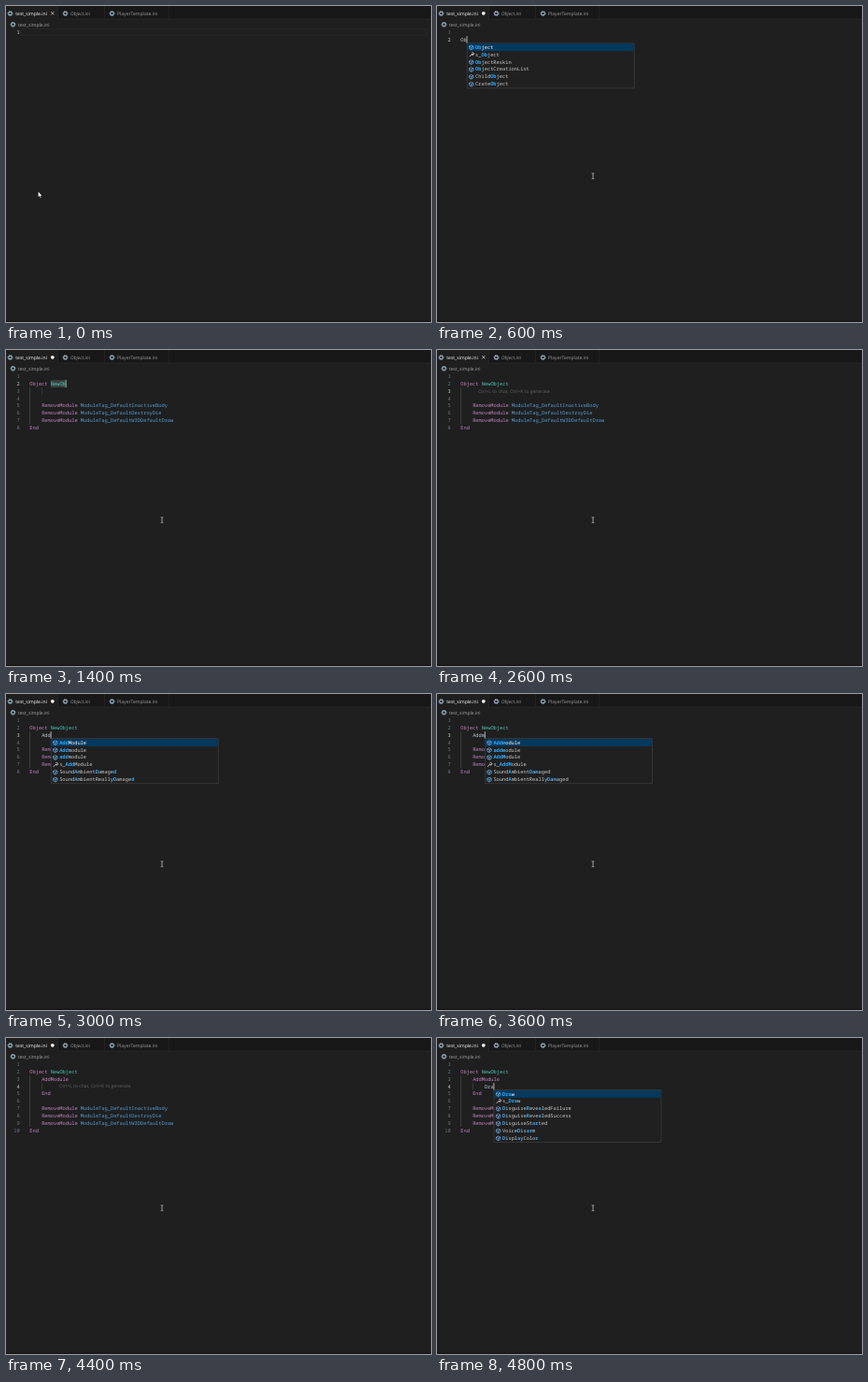
An HTML page for the animation above (5000 ms loop, 455 by 338 pixels).

```html
<!DOCTYPE html>
<html lang="en">
<head>
<meta charset="utf-8">
<title>Editor snippets</title>
<style>
  html, body { margin: 0; width: 100%; height: 100%; overflow: hidden; background: #1f1f1f; }
  svg { display: block; width: 455px; height: 338px; }
  text { white-space: pre; text-rendering: geometricPrecision; }
  .ui { font: 5.05px "Open Sans", "Noto Sans", sans-serif; }
  .code { font: 5.35px "Noto Sans Mono", "DejaVu Sans Mono", monospace; }
  .detail { font-size: 4.58px; }
  .match { fill: #2aaaff; font-weight: 600; }
</style>
</head>
<body>
<svg id="stage" viewBox="0 0 455 338">
  <defs>
    <g id="gear" fill="none" stroke="#9fbccb">
      <circle r="1.75" stroke-width="1.1"/>
      <circle r="2.5" stroke-width=".9" stroke-dasharray="1 .963"/>
    </g>
    <path id="cube" d="M0-2.3 2.2-1.2V1.2L0 2.4-2.2 1.2V-1.2ZM-2.2-1.2 0 0 2.2-1.2M0 0V2.4" fill="none" stroke="#75beff" stroke-width=".65"/>
    <path id="wrench" d="M-2 2 .6-.6M.4-.4A1.3 1.3 0 1 0 .6-2M.4-.4A1.3 1.3 0 0 0 2.2-1" fill="none" stroke="#d0d0d0" stroke-width=".9"/>
    <clipPath id="editor"><path d="M0 24.2H455V338H0Z"/></clipPath>
  </defs>
  <path d="M0 0H455V14H0Z" fill="#181818"/>
  <path d="M0 0H55V14.5H0Z" fill="#1f1f1f"/>
  <path d="M55.5 0V14M105.5 0V14M174 0V14M55 14H455" stroke="#292929" stroke-width=".7" fill="none"/>
  <path d="M0 336.8H455V338H0Z" fill="#141414"/>
  <use href="#gear" x="4.5" y="8"/>
  <use href="#gear" x="63.5" y="8"/>
  <use href="#gear" x="113.5" y="8"/>
  <use href="#gear" x="7.5" y="19.8"/>
  <g class="ui" fill="#9d9d9d">
    <text x="10.3" y="9.8" fill="#fff">test_simple.ini</text>
    <text x="69" y="9.8" font-style="italic">Object.ini</text>
    <text x="119" y="9.8">PlayerTemplate.ini</text>
    <text x="13" y="21.6" fill="#a9a9a9">test_simple.ini</text>
  </g>
  <g id="view"></g>
</svg>
<script>
const STEP = 200, LOOP = 5000;
const CHAR = 3.21, LEFT = 25.3, TOP = 24.3, ROW = 7.88;
const view = document.getElementById('view');
const colors = { key: '#c586c0', name: '#4ec9b0', tag: '#569cd6', plain: '#b4cbdc' };

const colX = c => LEFT + c * CHAR;
const rowY = line => TOP + (line - 1) * ROW;
const rect = (x, y, w, h, fill, more = '') =>
  `<rect x="${x}" y="${y}" width="${w}" height="${h}" fill="${fill}" ${more}/>`;
const text = (x, y, str, fill, cls = 'code', more = '') =>
  `<text class="${cls}" x="${x}" y="${y}" fill="${fill}" ${more}>${str}</text>`;

// Suggestion lists; brackets mark matched letters
const lists = {
  ob: ['[Ob]ject', 's_[Ob]ject', '[Ob]jectReskin', '[Ob]jectCreationList', 'Child[Ob]ject', 'Crate[Ob]ject'],
  new: ['[N]ame', '[N]umber', '[N]o[ne]', '[N]ormal', '[N]ext', '[N]umDozers',
    '[N]ode', '[N]eutral', 'Sou[n]d', 'Weapo[n]', 'Conditio[n]', 'Locomotio[n]'],
  a: ['[A]ddModule', '[A]ddmodule', '[a]ddmodule', 's_[A]ddModule', '[A]rmor', '[A]rmorSet',
    '[A]ction', '[A]ngle', '[A]nimation', '[A]mount', '[A]ttack', '[A]cceleration'],
  add: ['[Add]Module', '[Add]module', '[add]module', 's_[Add]Module',
    'Sound[A]mbient[D]amage[d]', 'Sound[A]mbientReally[D]amage[d]'],
  addm: ['[Addm]odule', '[addm]odule', '[AddM]odule', 's_[AddM]odule',
    'Sound[A]mbient[D]a[m]aged', 'Sound[A]mbientReally[D]a[m]aged'],
  dra: ['[Dra]w', 's_[Dra]w', '[D]isguise[R]eve[a]ledFailure', '[D]isguise[R]eve[a]ledSuccess',
    '[D]isguiseSt[ar]ted', 'Voice[D]is[ar]m', '[D]ispl[a]yColo[r]']
};

// Document states: each line is a list of [column, text, kind]
const removal = tag => [[4, 'RemoveModule', 'key'], [17, 'ModuleTag_Default' + tag, 'tag']];
const snippet = (name, body = [[]]) => [
  [], [[0, 'Object', 'key'], [7, name, 'name']], ...body, [],
  removal('InactiveBody'), removal('DestroyDie'), removal('W3DDefaultDraw'), [[0, 'End', 'key']]
];
const typed = word => snippet('NewObject', [[[4, word, 'plain']]]);
const nested = word => snippet('NewObject',
  [[[4, 'AddModule', 'key']], [[8, word, 'plain']], [[4, 'End', 'key']]]);
const blank = snippet('NewObject');

// at: [line, column] of the caret; pop: [list, selected row]; mark: width of the field
const steps = [
  { doc: [[]], at: [1, 0], saved: 1, off: 1, frame: 1, arrow: 1 },
  { doc: [[]], at: [1, 0], saved: 1, frame: 1, hint: 1 },
  { doc: [[], []], at: [2, 0], hint: 1 },
  { doc: [[], [[0, 'Ob', 'plain']]], at: [2, 2], pop: ['ob', 0] },
  { doc: snippet('ObjectName'), at: [2, 17], select: 1, guide: 3 },
  { doc: snippet('ObjectName'), at: [2, 17], select: 1, guide: 3, off: 1 },
  { doc: snippet('New'), at: [2, 10], mark: 3, pop: ['new', 0], guide: 3 },
  { doc: snippet('NewOb'), at: [2, 12], mark: 5, guide: 3 },
  { doc: snippet('NewObjec'), at: [2, 15], mark: 8, guide: 3 },
  { doc: blank, at: [2, 16], mark: 9, guide: 3 },
  { doc: blank, at: [2, 16], mark: 9, guide: 3, saved: 1, off: 1 },
  { doc: blank, at: [2, 16], mark: 9, guide: 3, saved: 1 },
  { doc: blank, at: [3, 4], hint: 1, saved: 1 },
  { doc: blank, at: [3, 4], hint: 1, saved: 1, off: 1 },
  { doc: typed('A'), at: [3, 5], pop: ['a', 0] },
  { doc: typed('Add'), at: [3, 7], pop: ['add', 0] },
  { doc: typed('Add'), at: [3, 7] },
  { doc: typed('Ad'), at: [3, 6] },
  { doc: typed('Addm'), at: [3, 8], pop: ['addm', 0] },
  { doc: typed('Addm'), at: [3, 8], pop: ['addm', 2] },
  { doc: typed('Addm'), at: [3, 8], pop: ['addm', 3] },
  { doc: nested(''), at: [4, 8], hint: 1, guide: 4 },
  { doc: nested(''), at: [4, 8], hint: 1, guide: 4, off: 1 },
  { doc: nested(''), at: [4, 8], hint: 1, guide: 4 },
  { doc: nested('Dra'), at: [4, 11], pop: ['dra', 0], guide: 4 }
];

function drawPopup([name, chosen], line, col) {
  const items = lists[name], x = colX(col) + .4, y = rowY(line + 1) - .2, h = items.length * ROW;
  let out = rect(x, y, 179, h + .8, '#202020', 'stroke="#454545" stroke-width=".6"');
  items.forEach((item, i) => {
    const top = y + .4 + i * ROW, on = i === chosen;
    if (on) out += rect(x + .3, top, 178.4, ROW, '#04395e');
    const icon = item.startsWith('s_') ? 'wrench' : 'cube';
    out += `<use href="#${icon}" x="${x + 4.6}" y="${top + 4}"/>`;
    const label = item.replace(/\[(.+?)\]/g, '<tspan class="match">$1</tspan>');
    out += text(x + 9, top + 5.5, label, on ? '#fff' : '#ccc');
    if (on && icon === 'wrench')
      out += text(x + 174.2, top + 5.4, 'Insert AddModule', '#d4dde5', 'code detail', 'text-anchor="end"');
  });
  return out;
}

function drawToolbar() {
  const words = [[84, 'Chat', '#ccc'], [98.5, 'Ctrl+L', '#777'], [120, 'Edit', '#ccc'], [132, 'Ctrl+K', '#777']];
  return '<g clip-path="url(#editor)">' + rect(82, 22, 69, 9, '#252525') +
    words.map(([x, str, fill]) => text(x, 27.6, str, fill, 'ui')).join('') + '</g>';
}

function drawPointer(arrow) {
  return arrow
    ? '<path d="M34.4 198.2V204.6L35.9 203.3 36.8 205.4 37.8 205 36.9 203H38.7Z" fill="#fff" stroke="#111" stroke-width=".4"/>'
    : '<path d="M165.7 178.9H166.6L167 179.3 167.4 178.9H168.3M167 179.3V184.4M165.7 184.8H166.6L167 184.4 167.4 184.8H168.3" fill="none" stroke="#d8d8d8" stroke-width=".7"/>';
}

function draw(s) {
  const [line, col] = s.at, x = colX(col), y = rowY(line);
  let out = s.saved
    ? '<path d="M48.2 6.2 51.4 9.4M51.4 6.2 48.2 9.4" stroke="#ddd" stroke-width=".7"/>'
    : '<circle cx="49.8" cy="7.8" r="1.9" fill="#f0f0f0"/>';
  if (s.frame) out += rect(16, y, 434, ROW - .4, 'none', 'stroke="#292929" stroke-width=".7"');
  if (s.doc.length > 2)
    out += rect(25.4, rowY(3), .6, (s.doc.length - 3) * ROW, '#505050');
  if (s.guide) out += rect(38.3, rowY(s.guide), .6, ROW, '#484848');
  if (s.select) out += rect(colX(7), y, 10 * CHAR, ROW, '#2a5a80');
  if (s.mark) out += rect(colX(7), y, s.mark * CHAR, ROW, '#3b4240');
  s.doc.forEach((parts, i) => {
    const base = rowY(i + 1) + 5.6;
    out += text(14.6, base, i + 1, i + 1 === line ? '#ccc' : '#6e7681', 'code', 'text-anchor="end"');
    for (const [c, str, kind] of parts) out += text(colX(c), base, str, colors[kind]);
  });
  if (s.hint) out += text(x + 6, y + 5.5, 'Ctrl+L to chat, Ctrl+K to generate', '#626262', 'ui');
  if (!s.off) out += rect(x - .1, y, .8, ROW, '#d4d4d4');
  if (s.select) out += drawToolbar();
  if (s.pop) out += drawPopup(s.pop, line, col);
  view.innerHTML = out + drawPointer(s.arrow);
}

let shown = -1;
const start = performance.now();
function tick() {
  const t = Math.max(0, performance.now() - start) % LOOP;
  const i = Math.floor(t / STEP);
  if (i !== shown) draw(steps[shown = i]);
  requestAnimationFrame(tick);
}
tick();
</script>
</body>
</html>
```
